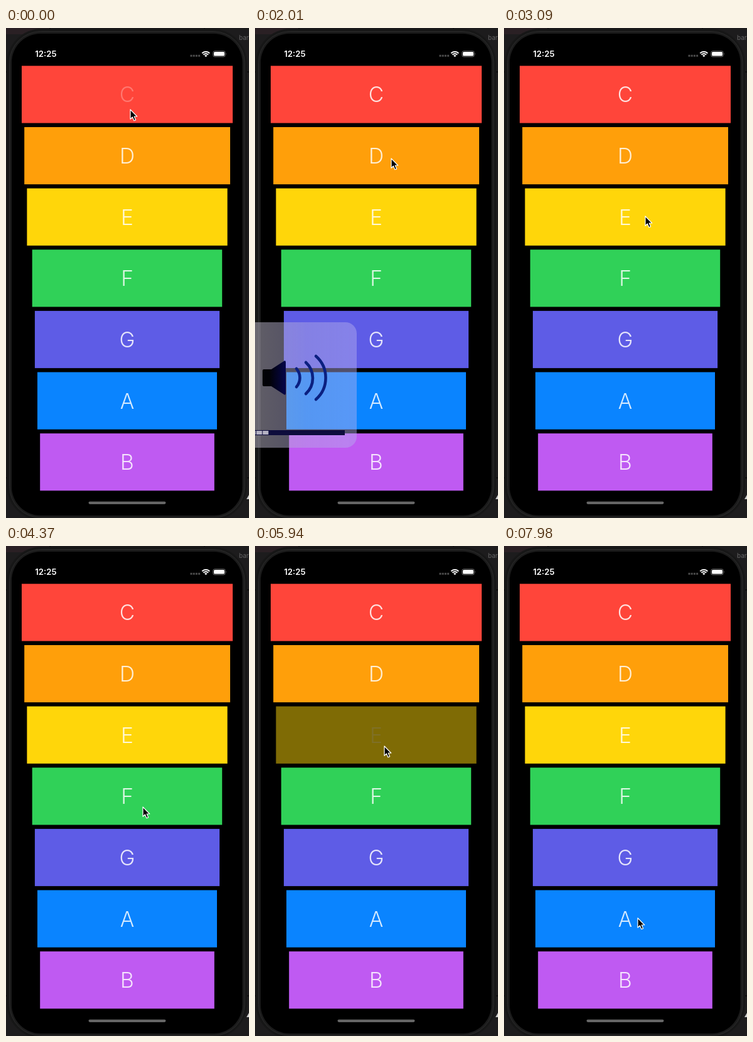
An HTML page for the animation above (8 s loop, 387x781 px).

```html
<!DOCTYPE html>
<html lang="en">
<head>
<meta charset="utf-8">
<title>Xylophone</title>
<style>
html, body { margin: 0; width: 100%; height: 100%; overflow: hidden; background: #1d1c1d; }
svg { display: block; width: 387px; height: 781px; }
text { font-family: Inter, Roboto, sans-serif; }
.note { font-size: 33.5px; font-weight: 300; fill: #fff; fill-opacity: .84; text-anchor: middle; }

/* Each key's cycle begins when the finger lifts, at --t. */
.key, .label { animation: 8s linear calc(var(--t) - 8s) infinite; }
.key { animation-name: dim; }
.label { animation-name: tap; }
.label.hold { animation-name: hold; }
.label.slow { animation-name: slow; }
.hud { animation: hud 8s linear infinite; }
.cursor { animation: travel 8s ease-in-out infinite; }

@keyframes dim {
  0%, 2.9% { opacity: .5; }
  2.901%, 100% { opacity: 1; }
}
@keyframes tap {
  0%, 1.1% { opacity: .33; }
  3.9%, 98.124% { opacity: 1; }
  98.125%, 100% { opacity: .33; }
}
@keyframes slow {
  0%, 1.1% { opacity: .33; }
  3.6%, 97.374% { opacity: 1; }
  97.375%, 100% { opacity: .33; }
}
@keyframes hold {
  0%, 1.1% { opacity: .33; }
  3.9%, 89.999% { opacity: 1; }
  90%, 100% { opacity: .33; }
}
@keyframes hud {
  0%, 11.874% { opacity: 0; }
  11.875%, 25.875% { opacity: 1; }
  31.5%, 100% { opacity: 0; }
}
@keyframes travel {
  0%, 22.5% { transform: translate(198px, 130px); }
  25.125%, 36.125% { transform: translate(217px, 208px); }
  38.625%, 50.875% { transform: translate(225px, 300px); }
  54.625%, 66.5% { transform: translate(218px, 416px); }
  70.125%, 78.125% { transform: translate(206px, 319px); }
  83%, 97.5% { transform: translate(198px, 509px); }
  99.75%, 100% { transform: translate(213px, 593px); }
}
</style>
</head>
<body>
<svg viewBox="0 0 387 781">
  <defs>
    <linearGradient id="glass">
      <stop offset=".19" stop-color="#bab5c4" stop-opacity=".52"/>
      <stop offset=".6" stop-color="#b6b0e2" stop-opacity=".44"/>
      <stop offset="1" stop-color="#b4afef" stop-opacity=".46"/>
    </linearGradient>
    <linearGradient id="horn">
      <stop offset=".3" stop-color="#020207"/>
      <stop offset="1" stop-color="#06064a"/>
    </linearGradient>
  </defs>

  <!-- desktop and phone -->
  <path d="M0 0H70V10H0Z" fill="#2a2024"/>
  <path d="M70 0V5M316 0V5M0 70H5M382 70H387M0 717H5M382 717H387" stroke="#0d0d0d" stroke-width="2"/>
  <text x="371" y="19" font-size="10" fill="#666">bar</text>
  <path d="M387 744L383 751H387Z" fill="#ccc"/>
  <rect x="1" y="1" width="383" height="784" rx="56" fill="#171717"/>
  <rect x="5.5" y="5.5" width="374.5" height="775" rx="50" fill="#1b1b1b" stroke="#2c2c2c"/>
  <rect x="9" y="9" width="367.500" height="768" rx="46"/>

  <!-- status bar -->
  <text x="46.300" y="46" font-size="13.200" font-weight="600" fill="#fff">12:25</text>
  <path d="M293.500 44.300h16" stroke="#4c4c4c" stroke-width="3" stroke-dasharray="3 1.200"/>
  <g fill="none" stroke="#fff" stroke-width="1.900">
    <path d="M312.300 40.200a8.600 8.600 0 0 1 12 0M314.400 42.600a5.500 5.500 0 0 1 7.800 0"/>
  </g>
  <path d="M318.300 46.300l-2.200-2.300a3.100 3.100 0 0 1 4.400 0z" fill="#fff"/>
  <rect x="329.700" y="36.700" width="19.600" height="9.200" rx="2.700" fill="none" stroke="#777" stroke-width=".9"/>
  <rect x="331" y="38" width="17" height="6.600" rx="1.500" fill="#fff"/>
  <path d="M350.300 39.800q1.300 1.500 0 3z" fill="#888"/>

  <g id="keys"></g>
  <rect x="131.500" y="754.700" width="123" height="4.200" rx="2.100" fill="#666"/>

  <!-- volume panel -->
  <g class="hud">
    <rect x="-38" y="469" width="200" height="200" rx="18" fill="url(#glass)"/>
    <path d="M14 544H26L46 531Q49 529 49 533V582Q49 586 46 584L26 571H14Q12 571 12 569V546Q12 544 14 544Z" fill="url(#horn)"/>
    <g fill="none" stroke="#0b2080" stroke-width="4.600" stroke-linecap="round">
      <path d="M66 543a22 22 0 0 1 0 29M81 533a34 34 0 0 1 0 50M97 523a46 46 0 0 1 0 69"/>
    </g>
    <path d="M-19 645H143" stroke="#0d0c3c" stroke-width="8"/>
    <path d="M-18 645H22" stroke="#b4b1c2" stroke-width="6" stroke-dasharray="9.100 1"/>
  </g>

  <g class="cursor">
    <path d="M0 0V15.200L3.400 12L5.900 17.800L8.600 16.600L6.200 11H10.800Z" stroke="#fff" stroke-width="1.200" stroke-linejoin="round"/>
  </g>
</svg>
<script>
// name, colour, left, right, then release times in seconds with an optional press style
const notes = [
  ['C', '#ff453a', 25, 361, [.8, 'hold']],
  ['D', '#ff9f0a', 29.2, 357, [2.35]],
  ['E', '#ffd60a', 33.4, 352.6, [3.63], [5.94]],
  ['F', '#30d158', 41.7, 344.2, [4.88, 'slow']],
  ['G', '#5e5ce6', 45.9, 340.1, [7.12]],
  ['A', '#0a84ff', 50, 336],
  ['B', '#bf5af2', 54.2, 331.8]
];

const wrap = (kind, inner, presses) => presses.reduce(
  (body, [time, style = '']) =>
    `<g class="${kind} ${style}" style="--t:${time}s">${body}</g>`, inner);

document.getElementById('keys').innerHTML = notes.map(
  ([name, color, left, right, ...presses], i) => {
    const y = 60.3 + 97.65 * i;
    const bar = `<rect x="${left}" y="${y}" width="${right - left}" height="91.2" fill="${color}"/>`;
    const text = `<text class="note" x="193" y="${y + 58}">${name}</text>`;
    return wrap('key', bar + wrap('label', text, presses), presses);
  }).join('');
</script>
</body>
</html>
```
